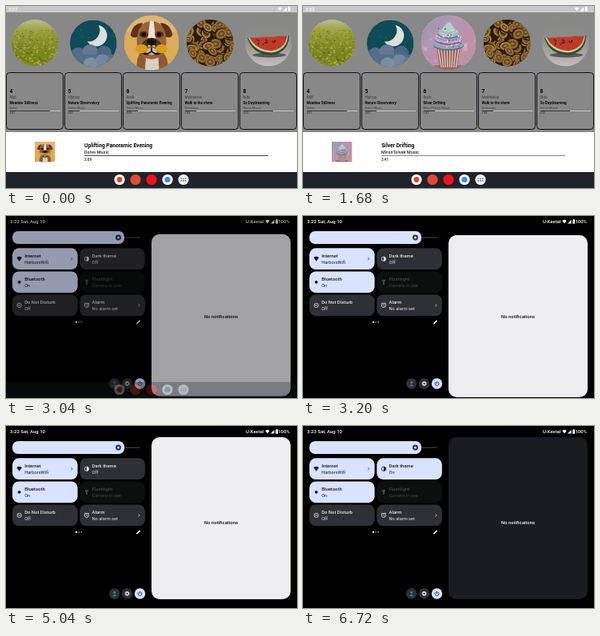
Animation of 364 by 228 pixels, one loop 8000 ms. Source, as an HTML page:

```html
<!DOCTYPE html>
<html lang="en">
<head>
<meta charset="utf-8">
<title>Music player and quick settings</title>
<style>
html, body { margin: 0; width: 100%; height: 100%; overflow: hidden; background: #000; }
svg { display: block; }
#stage { width: 100%; height: 100%; }
text { font-family: Roboto, "Open Sans", sans-serif; white-space: pre; }
</style>
</head>
<body>
<svg id="stage" viewBox="0 0 364 228"></svg>
<script>
const LOOP = 8000;
const ACTIVE = '#d9e2ff', OFF = '#2f3033', INK = '#111a2c';

const clamp = v => Math.max(0, Math.min(1, v));
const span = (t, a, b) => clamp((t - a) / (b - a));
const ease = p => p * p * (3 - 2 * p);
const easeOut = p => 1 - (1 - p) ** 3;
const rgb = h => [1, 3, 5].map(i => parseInt(h.slice(i, i + 2), 16));
const mix = (a, b, p) => {
  const to = rgb(b);
  return `rgb(${rgb(a).map((v, i) => Math.round(v + (to[i] - v) * p))})`;
};
function random(seed) {
  return () => (seed = (seed * 16807) % 2147483647) / 2147483647;
}
const repeat = (n, fn) => Array.from({ length: n }, (_, i) => fn(i)).join('');

const rect = (x, y, w, h, fill, r = 0, more = '') =>
  `<rect x="${x}" y="${y}" width="${w}" height="${h}" rx="${r}" fill="${fill}" ${more}/>`;
const disc = (x, y, r, fill, more = '') =>
  `<circle cx="${x}" cy="${y}" r="${r}" fill="${fill}" ${more}/>`;
const oval = (x, y, rx, ry, fill, more = '') =>
  `<ellipse cx="${x}" cy="${y}" rx="${rx}" ry="${ry}" fill="${fill}" ${more}/>`;
const path = (d, fill, more = '') => `<path d="${d}" fill="${fill}" ${more}/>`;
const line = (d, color, w, more = '') =>
  path(d, 'none', `stroke="${color}" stroke-width="${w}" stroke-linecap="round" stroke-linejoin="round" ${more}`);
const rule = (x1, x2, y, color) => rect(x1, y, x2 - x1, 1, color);
const text = (x, y, size, str, fill, weight = 400, more = '') =>
  `<text x="${x}" y="${y}" font-size="${size}" fill="${fill}" font-weight="${weight}" ${more}>${str}</text>`;
const gradient = (id, colors, dir = 'x2="0" y2="1"') =>
  `<linearGradient id="${id}" ${dir}>${colors.map((c, i) =>
    `<stop offset="${i / (colors.length - 1)}" stop-color="${c}"/>`).join('')}</linearGradient>`;

// Cover pictures, each drawn in a 100 x 100 box.
function meadow() {
  const rnd = random(11), tones = ['#a3a83a', '#6d7c1c', '#b4b54c', '#55681a'];
  return rect(0, 0, 100, 100, 'url(#grass)') + repeat(260, () => {
    const x = rnd() * 100, y = 22 + rnd() * 78;
    return oval(x, y, 1 + y / 60, .8 + y / 90, tones[Math.floor(rnd() * 4)], 'opacity=".75"');
  });
}
function night() {
  const rnd = random(5);
  return rect(0, 0, 100, 100, '#0f4a57') +
    repeat(12, () => disc(rnd() * 100, rnd() * 55, .7, '#8fb0b6')) +
    path('M61 11A23 23 0 1 1 37 46A24 24 0 0 0 61 11Z', '#dcdfdc') +
    disc(18, 76, 17, '#566d88') + disc(43, 69, 17, '#64798f') + disc(73, 71, 16, '#4e6682') +
    rect(0, 74, 100, 26, '#566d88') +
    disc(70, 89, 16, '#71869c') + disc(44, 95, 15, '#7b8ea3') + disc(91, 93, 14, '#637991');
}
function dog() {
  return rect(0, 0, 100, 100, '#dcab5b') + rect(0, 0, 100, 30, '#e0b673') +
    path('M24 100Q20 80 32 64H68Q82 78 80 100Z', '#8c5a34') +
    path('M38 100L40 74H62L64 100Z', '#d9cfc6') +
    path('M34 14Q16 14 12 36Q16 44 27 38Z', '#5b3320') +
    path('M66 14Q84 14 88 36Q84 44 73 38Z', '#5b3320') +
    path('M27 26Q36 10 50 11Q64 10 73 26Q80 48 74 64Q64 80 50 80Q36 80 26 64Q20 48 27 26Z', '#9a6238') +
    path('M47 11H54L57 38Q60 46 50 48Q41 46 44 38Z', '#ebe3da') +
    oval(36, 35, 8, 6, '#5a351f') + oval(64, 35, 8, 6, '#5a351f') +
    disc(36, 35, 4, '#160d09') + disc(64, 35, 4, '#160d09') +
    path('M40 44Q50 38 60 44Q74 54 70 68Q60 76 50 70Q40 76 30 68Q26 54 40 44Z', '#4d3426') +
    path('M45 52H55L60 68Q50 76 40 68Z', '#c9b8ab') +
    oval(50, 49, 9, 6, '#151211') +
    line('M50 54V64M36 70Q44 72 50 65Q56 72 64 70', '#241813', 2.5) +
    oval(32, 61, 11, 8, '#dc9a1c') + oval(68, 61, 11, 8, '#dc9a1c') +
    line('M43 60Q50 55 57 60', '#8f5f10', 2);
}
function cupcake() {
  const rnd = random(23);
  const tier = (y, rx, ry, c, hi) => oval(50, y + 2, rx, ry, '#665f80') + oval(50, y, rx, ry, c) +
    line(`M${50 - rx * .8} ${y - 1}Q50 ${y + ry} ${50 + rx * .8} ${y - 3}`, hi, 3);
  return rect(0, 0, 100, 100, 'url(#pastel)') +
    repeat(24, () => disc(rnd() * 100, rnd() * 100, 1 + rnd() * 4, '#fff', 'opacity=".2"')) +
    oval(50, 95, 34, 5, '#8a6f7d') +
    path('M28 55H72L65 96H35Z', '#8f5f58') +
    repeat(8, i => line(`M${31 + i * 5.4} 58L${37 + i * 3.8} 94`, '#dcbfb2', 2.2)) +
    tier(52, 28, 10, '#83a9b8', '#cf93bb') + tier(42, 25, 10, '#c7a3c4', '#6fa3b4') +
    tier(32, 19, 9, '#8fc0c2', '#dcb9d3') + path('M36 28Q46 14 52 12Q58 18 63 28Q50 35 36 28Z', '#adcfd2') +
    repeat(40, () => disc(27 + rnd() * 46, 24 + rnd() * 34, 1.2,
      ['#b43a78', '#2f6178', '#f3e3a6', '#f4eef2'][Math.floor(rnd() * 4)]));
}
function coins() {
  const rnd = random(41);
  return rect(0, 0, 100, 100, '#2b1a0a') + repeat(70, () => {
    const x = rnd() * 100, y = rnd() * 100, rx = 9 + rnd() * 4, ry = 7 + rnd() * 4;
    const turn = `transform="rotate(${rnd() * 180} ${x} ${y})"`;
    return oval(x + 1, y + 1.5, rx + 1, ry + 1, '#24150a', turn) +
      oval(x, y, rx, ry, rnd() < .5 ? '#a2763a' : '#7a5526', turn) +
      oval(x, y, rx * .72, ry * .72, '#6b4a20', `stroke="#cda45f" stroke-width="1" ${turn}`) +
      line(`M${x - 3} ${y}h6M${x} ${y - 2}v4`, '#b98f4d', 1.4, turn);
  });
}
function melon() {
  const rnd = random(8);
  return rect(0, 0, 100, 100, 'url(#table)') + oval(52, 76, 36, 5, '#5b5655') +
    path('M5 39L94 34Q94 70 56 76Q16 75 5 39Z', '#2c4a27') +
    path('M7 39L92 34.5Q90 66 56 71Q20 70 7 39Z', '#c9cc98') +
    path('M10 39L90 35Q87 62 56 67Q23 65 10 39Z', '#bd3a2c') +
    repeat(14, () => oval(26 + rnd() * 50, 43 + rnd() * 14, 1, 1.8, '#35130f'));
}

const cover = (id, x, y, size, round, more = '') =>
  `<svg x="${x}" y="${y}" width="${size}" height="${size}" viewBox="0 0 100 100" ${more}>` +
  `<use href="#${id}" clip-path="url(#${round ? 'round' : 'square'})"/></svg>`;

const tracks = {
  first: ['Uplifting Panoramic Evening', 'Dolvo Music', '2:09'],
  next: ['Silver Drifting', 'MironTolvek Music', '3:41'],
};
// Genre, length of the dark part of the bar, then title, artist and time.
const cards = [
  ['R&amp;B', 54, 'Meadow Stillness', 'Dolvo', '2:01'],
  ['Hiphop', 18, 'Nature Observatory', 'Dolvo Music', '2:07'],
  ['Rock', 18],
  ['Meditation', 18, 'Walk to the shore', 'Orlemusic', '1:59'],
  ['Kids', 41, 'So Daydreaming', 'Brinta Music', '2:32'],
];

const details = (x, [title, artist, time]) =>
  text(x, 123.3, 4.5, title, '#0a0a0a', 700) +
  text(x, 128.6, 4, artist, '#3a3a3a') + text(x, 135.3, 3.6, time, '#222');

function card(i) {
  const x = 1 + i * 73, [genre, played, ...info] = cards[i];
  return rect(x - .5, 83.5, 71, 71, 'none', 4, 'stroke="#101018" stroke-width="1"') +
    text(x + 3.4, 109, 6.6, i + 4, '#050505', 700) +
    text(x + 3.4, 115.8, 4.6, genre, '#3c3c3c') +
    (info.length ? details(x + 3.4, info) : '') +
    rule(x + 4, x + played, 131, '#3a3a3a') + rule(x + played, x + 67, 131, '#c4c4c4');
}

const player = (id, art, track, bar) => `<g id="${id}">` +
  details(150.4, track) + cover(art, 36, 170, 25.5, false) +
  text(98, 177.2, 6.7, track[0], '#080808', 700) +
  text(98, 185, 5.3, track[1], '#1c1c1c', 500, 'letter-spacing=".15"') +
  rule(98, 328, 187, bar) + text(98, 193.7, 4.6, track[2], '#222', 500) + '</g>';

const wifi = (x, y, s, c) =>
  path(`M${x - s} ${y - s * .5}Q${x} ${y - s * 1.3} ${x + s} ${y - s * .5}L${x} ${y + s * .9}Z`, c);
const statusIcons = (x, y, c) => wifi(x, y, 2.6, c) +
  path(`M${x + 4} ${y + 2.4}h4.6v-4.8z`, c) + rect(x + 10.3, y - 2.6, 2.8, 5.2, c, .6) +
  rect(x + 11, y - 3.2, 1.4, 1, c);

function home() {
  return rect(0, 0, 364, 228, '#888') + rect(0, 0, 364, 8, '#c9c9c9') +
    text(3, 6.4, 5.8, '3:22', '#fff', 500) + statusIcons(342.5, 4, '#fff') +
    cover('meadow', 7, 17, 58.5, true) + cover('night', 80, 17.5, 58.5, true) +
    cover('dog', 147.5, 11.5, 69, true) + cover('cupcake', 147.5, 11.5, 69, true, 'id="fresh"') +
    cover('coins', 226, 17, 58.5, true) + cover('melon', 299, 17, 58.5, true) +
    repeat(5, card) + rect(0, 158, 364, 50, '#fff') +
    player('first', 'dog', tracks.first, '#444') + player('next', 'cupcake', tracks.next, '#888');
}

function dock() {
  const at = i => 142 + i * 20, y = 217.5;
  return rect(0, 208, 364, 20, '#202329') +
    disc(at(0), y, 6.6, '#fff') + disc(at(0), y, 3.4, '#e04336') +
    disc(at(1), y, 6.6, '#e04a3a') + disc(at(2), y, 6.6, '#f2121b') +
    disc(at(3), y, 6.6, '#fff') + disc(at(3), y, 3.6, '#4285f4') +
    disc(at(4), y, 6.6, '#f1f1f4') +
    repeat(6, i => disc(at(4) - 2.6 + i % 3 * 2.6, y - 1.2 + Math.floor(i / 3) * 2.6, .8, '#55585f'));
}

// Small icons for the tiles, centred on x, y.
const icons = {
  wifi: (x, y, c) => wifi(x, y, 3.3, c),
  theme: (x, y, c) => disc(x, y, 2.7, 'none', `stroke="${c}" stroke-width=".8"`) +
    path(`M${x} ${y - 2.7}A2.7 2.7 0 0 1 ${x} ${y + 2.7}Z`, c),
  dot: (x, y, c) => disc(x, y, 1.9, c),
  torch: (x, y, c) => path(`M${x - 2} ${y - 3}h4v1.6l-1 1.2v3.4h-2v-3.4l-1-1.2z`, c),
  quiet: (x, y, c) => disc(x, y, 2.7, 'none', `stroke="${c}" stroke-width=".8"`) +
    line(`M${x - 1.3} ${y}h2.6`, c, .8),
  alarm: (x, y, c) => disc(x, y, 2.6, 'none', `stroke="${c}" stroke-width=".8"`) +
    line(`M${x} ${y - 1.4}v1.6l1 .8M${x - 3} ${y - 2}l1.2 -1.1M${x + 3} ${y - 2}l-1.2 -1.1`, c, .7),
};

function tile(col, row, icon, label, state, bg, ink, arrow) {
  const x = 8 + col * 84.3, y = 40.3 + row * 29.1;
  return rect(x, y, 81.6, 26.8, bg, 8) + icons[icon](x + 8.6, y + 13.4, ink) +
    text(x + 15.2, y + 11.6, 5.9, label, ink, 500) + text(x + 15.2, y + 19.8, 5.7, state, ink) +
    (arrow ? line(`M${x + 73.5} ${y + 12}l1.4 1.4l-1.4 1.4`, ink, .7) : '');
}

function shade() {
  const grey = '#e4e4e8', dim = '#454746';
  return text(5, 9.3, 6, '<tspan id="clock">3:22</tspan> Sat, Aug 10', '#fff', 500) +
    text(322.3, 9.3, 5.9, 'U-Kestal', '#fff', 500, 'text-anchor="end"') +
    statusIcons(327, 7.2, '#fff') + text(340.5, 9.3, 5.9, '100%', '#fff', 500) +
    line('M146 27H167', '#333439', 1.5) + rect(8, 19, 140, 16, ACTIVE, 7) +
    disc(140.5, 27, 3.4, INK) + disc(140.5, 27, 1.5, ACTIVE) +
    disc(140.5, 27, 2.5, 'none', `stroke="${ACTIVE}" stroke-width=".6" stroke-dasharray=".7 1.26"`) +
    tile(0, 0, 'wifi', 'Internet', 'HarborsWifi', ACTIVE, INK, true) +
    '<g id="themeOff">' + tile(1, 0, 'theme', 'Dark theme', 'Off', OFF, grey) + '</g>' +
    '<g id="themeOn">' + tile(1, 0, 'theme', 'Dark theme', 'On', ACTIVE, INK) + '</g>' +
    tile(0, 1, 'dot', 'Bluetooth', 'On', ACTIVE, INK) +
    tile(1, 1, 'torch', 'Flashlight', 'Camera in use', '#0d0f0e', dim) +
    tile(0, 2, 'quiet', 'Do Not Disturb', 'Off', OFF, grey) +
    tile(1, 2, 'alarm', 'Alarm', 'No alarm set', OFF, grey, true) +
    disc(88, 133, 1.2, '#fff') + disc(91.2, 133, 1, '#77787c') + disc(94.2, 133, 1, '#77787c') +
    line('M163.8 134.8l3.4 -3.4', '#fff', 1.5) +
    disc(135.7, 210, 6.7, OFF) + disc(135.7, 208.6, 1.6, '#3f7a94') +
    path('M132.8 213.2Q135.7 208.6 138.6 213.2Z', '#3f7a94') +
    disc(151.6, 210, 6.7, OFF) + disc(151.6, 210, 1.8, 'none', 'stroke="#fff" stroke-width="1.2"') +
    disc(151.6, 210, 2.6, 'none', 'stroke="#fff" stroke-width=".8" stroke-dasharray="1 1.04"') +
    disc(167.5, 210, 6.7, ACTIVE) + line('M167.5 207.2v2.6M165.7 208.3a2.5 2.5 0 1 0 3.6 0', INK, .8) +
    rect(182, 14, 174, 203, '#eee', 10, 'id="panel"') +
    text(269, 123.3, 5.9, 'No notifications', '#111', 500, 'id="empty" text-anchor="middle"');
}

const art = { meadow, night, dog, cupcake, coins, melon };
const stage = document.getElementById('stage');
stage.innerHTML = '<defs>' +
  gradient('grass', ['#b9bd94', '#98a03c', '#868f2a', '#78851f', '#858e28']) +
  gradient('pastel', ['#7d9fae', '#b795b4', '#c08fa8', '#b59a9c'], 'x2="1" y2="1"') +
  gradient('table', ['#858585', '#8c8b8a', '#a3a09e', '#c2bfbd']) +
  '<clipPath id="round"><circle cx="50" cy="50" r="50"/></clipPath>' +
  '<clipPath id="square"><rect width="100" height="100"/></clipPath>' +
  Object.entries(art).map(([id, draw]) => `<g id="${id}">${draw()}</g>`).join('') + '</defs>' +
  home() + rect(0, 0, 364, 228, '#000', 0, 'id="scrim"') +
  `<g id="shade">${shade()}</g><g id="dock">${dock()}</g>`;

const part = id => document.getElementById(id);
const set = (id, name, value) => part(id).setAttribute(name, value);
const fade = (id, value) => set(id, 'opacity', value);

function draw(t) {
  const swapped = t >= 560;
  fade('first', swapped ? 0 : 1);
  fade('next', swapped ? 1 : 0);
  fade('fresh', span(t, 520, 640));

  fade('scrim', span(t, 2800, 3000));
  fade('shade', span(t, 2830, 3140));
  fade('dock', 1 - .7 * span(t, 2830, 3040) - .3 * span(t, 3040, 3160));

  // The panel overshoots while pulled, then settles upwards.
  const drop = 10 * easeOut(span(t, 2880, 3200)) * (1 - ease(span(t, 3480, 4000)));
  set('panel', 'y', 14 + drop);
  set('empty', 'y', 123.3 + drop / 2);

  const dark = ease(span(t, 5120, 5520));
  set('panel', 'fill', mix('#eeeef0', '#1b1c1f', dark));
  set('empty', 'fill', mix('#111111', '#f4f4f6', dark));
  const on = span(t, 5060, 5300);
  fade('themeOff', 1 - span(on, .8, 1));
  fade('themeOn', on);
  part('clock').textContent = t < 5200 ? '3:22' : '3:23';
}

function tick() {
  draw(performance.now() % LOOP);
  requestAnimationFrame(tick);
}
tick();
</script>
</body>
</html>
```
